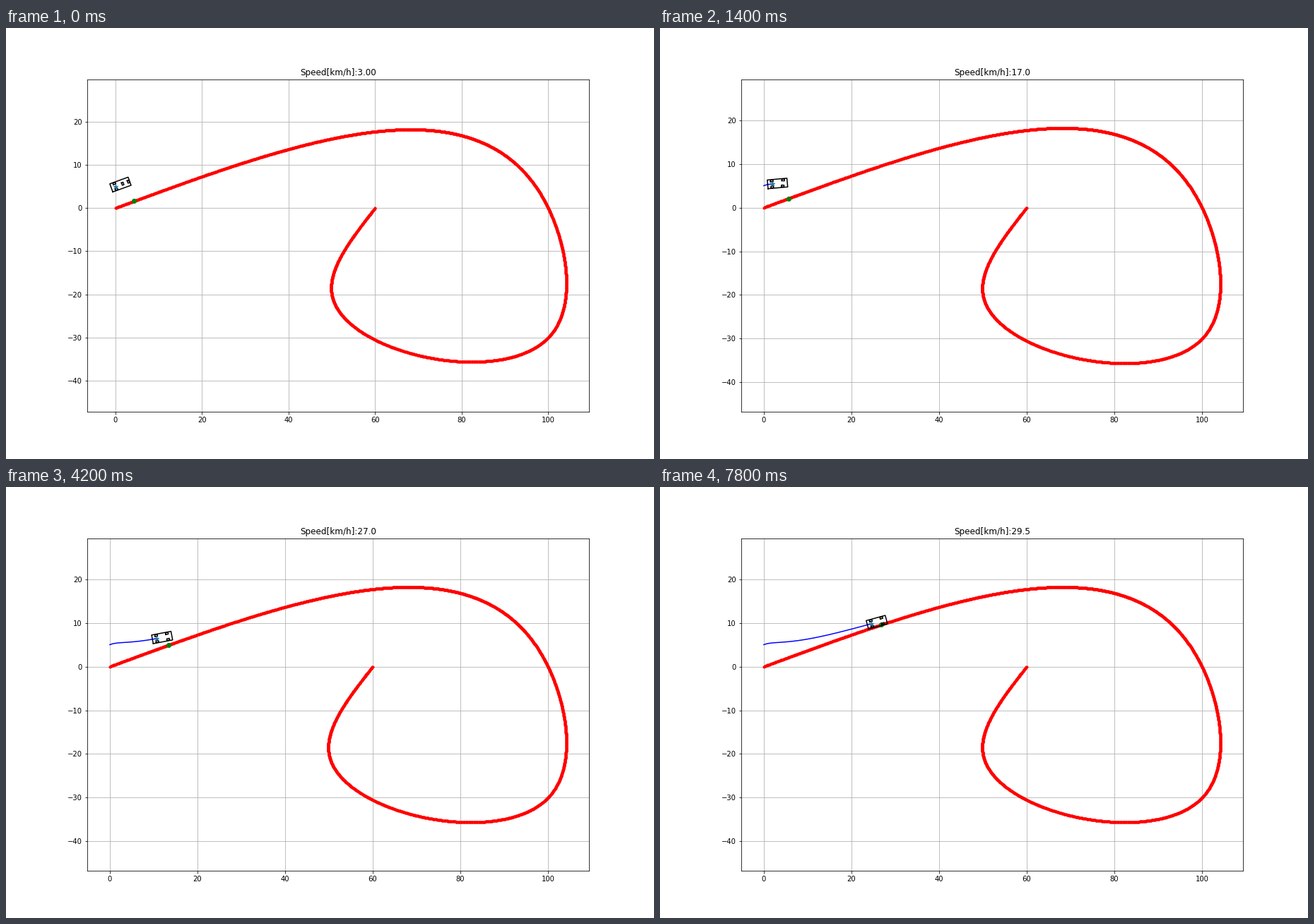
Animation of 917 by 611 pixels, one loop 8000 ms. Source, as a matplotlib script:

```python
import numpy as np
import matplotlib.pyplot as plt
from matplotlib.animation import FuncAnimation

W, H, DPI = 917, 611, 72
FRAMES, INTERVAL = 40, 200

# Steering controller
GAIN = 0.5
SPEED_GAIN = 1.0
DT = 0.1
BASE = 2.9
MAX_STEER = np.radians(30)
TARGET_SPEED = 30 / 3.6

# Car shape in metres
LENGTH, WIDTH, REAR = 4.5, 2.0, 1.0
WHEEL_LEN, WHEEL_WIDTH, TREAD, AXLE_GAP = 0.3, 0.2, 0.7, 2.5


def natural_spline(s, p, t):
    """Value and slope at t of the natural cubic spline through (s, p)."""
    n, h = len(s), np.diff(s)
    a, b = np.eye(n), np.zeros(n)
    for i in range(1, n - 1):
        a[i, i - 1:i + 2] = h[i - 1], 2 * (h[i - 1] + h[i]), h[i]
        b[i] = 3 * ((p[i + 1] - p[i]) / h[i] - (p[i] - p[i - 1]) / h[i - 1])
    c = np.linalg.solve(a, b)
    d = np.diff(c) / (3 * h)
    m = np.diff(p) / h - h * (c[1:] + 2 * c[:-1]) / 3
    i = np.clip(np.searchsorted(s, t, side="right") - 1, 0, n - 2)
    u = t - s[i]
    value = p[i] + m[i] * u + c[i] * u**2 + d[i] * u**3
    return value, m[i] + 2 * c[i] * u + 3 * d[i] * u**2


def make_course(px, py, step=0.1):
    s = np.append(0, np.cumsum(np.hypot(np.diff(px), np.diff(py))))
    t = np.arange(0, s[-1], step)
    x, dx = natural_spline(s, px, t)
    y, dy = natural_spline(s, py, t)
    return x, y, np.arctan2(dy, dx)


def wrap(angle):
    return (angle + np.pi) % (2 * np.pi) - np.pi


def simulate(steps):
    """Drive along the course; rows of x, y, yaw, speed, steer, target index."""
    x, y, yaw, v, target = 0.0, 5.0, np.radians(20), 0.0, 0
    rows = [(x, y, yaw, v, 0.0, 0)]
    for _ in range(steps):
        dx = x + BASE * np.cos(yaw) - cx
        dy = y + BASE * np.sin(yaw) - cy
        near = int(np.argmin(np.hypot(dx, dy)))
        error = dx[near] * np.sin(yaw) - dy[near] * np.cos(yaw)
        target = max(target, near)
        steer = wrap(cyaw[target] - yaw) + np.arctan2(GAIN * error, v)
        turn = np.clip(steer, -MAX_STEER, MAX_STEER)
        accel = SPEED_GAIN * (TARGET_SPEED - v)
        x += v * np.cos(yaw) * DT
        y += v * np.sin(yaw) * DT
        yaw = wrap(yaw + v / BASE * np.tan(turn) * DT)
        v += accel * DT
        rows.append((x, y, yaw, v, steer, target))
    return rows


def box(x0, x1, y0, y1):
    return np.array([[x0, x1, x1, x0, x0], [y0, y0, y1, y1, y0]])


def rotate(points, angle):
    c, s = np.cos(angle), np.sin(angle)
    return np.array([[c, -s], [s, c]]) @ points


def draw_car(x, y, yaw, steer):
    parts = [box(-REAR, LENGTH - REAR, -WIDTH / 2, WIDTH / 2)]
    for side in (-TREAD, TREAD):
        wheel = box(-WHEEL_LEN, WHEEL_LEN, side - WHEEL_WIDTH, side + WHEEL_WIDTH)
        # front wheels swing around the middle of their axle
        parts += [wheel, rotate(wheel, steer) + [[AXLE_GAP], [0]]]
    for part in parts:
        px, py = rotate(part, yaw)
        ax.plot(px + x, py + y, "-k")
    ax.plot(x, y, "*", color="C0")


def draw(frame):
    n = frame + 1
    x, y, yaw, v, steer, target = states[n]
    ax.clear()
    ax.plot(cx, cy, ".r")
    ax.plot([r[0] for r in states[:n + 1]], [r[1] for r in states[:n + 1]], "-b")
    ax.plot(cx[target], cy[target], "og")
    draw_car(x, y, yaw, steer)
    ax.axis("equal")
    ax.grid(True)
    ax.set_title("Speed[km/h]:" + f"{v * 3.6 + 1e-9:.6f}"[:4])
    return []


cx, cy, cyaw = make_course(np.array([0.0, 100, 100, 50, 60]),
                           np.array([0.0, 0, -30, -20, 0]))
states = simulate(FRAMES)

fig, ax = plt.subplots(figsize=((W + 1e-6) / DPI, (H + 1e-6) / DPI), dpi=DPI)
anim = FuncAnimation(fig, draw, frames=FRAMES, interval=INTERVAL,
                     init_func=lambda: draw(0), repeat=True, repeat_delay=0)
plt.show()
```
